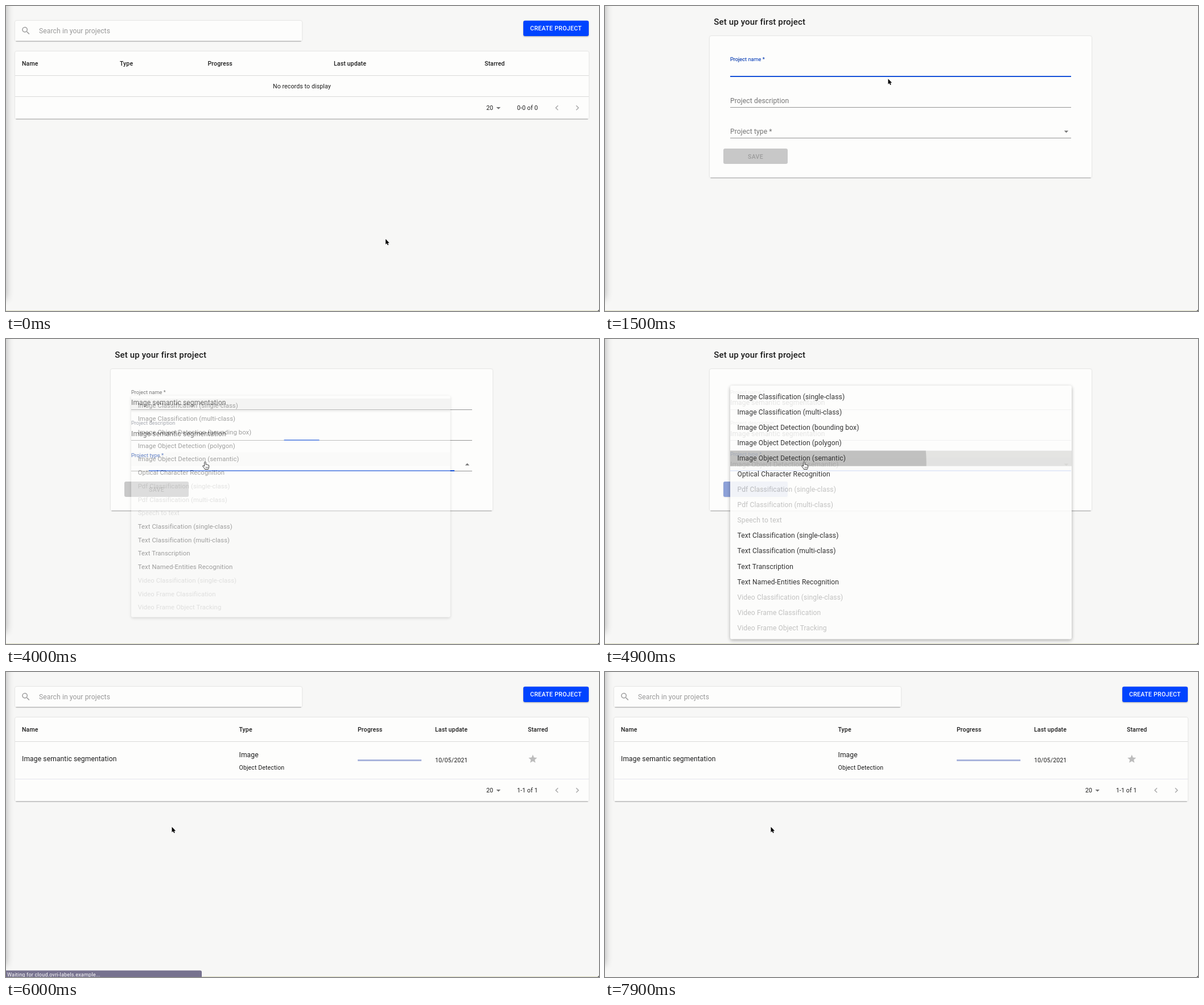
Write an HTML page that moves like this. It is 1042 px wide and 537 px high and loops after 8000 ms.

```html
<!DOCTYPE html>
<html lang="en">
<head>
<meta charset="utf-8">
<title>Project setup</title>
<style>
html, body { margin: 0; width: 100%; height: 100%; overflow: hidden; background: #f7f7f6; }
svg { display: block; width: 1042px; height: 537px; font-family: Roboto, sans-serif; }
text { white-space: pre; }
.card { filter: drop-shadow(0 .5px .8px rgba(0,0,0,.18)); }
.btn { filter: drop-shadow(0 1px 1px rgba(0,0,0,.3)); }
.menu { filter: drop-shadow(0 2px 3px rgba(0,0,0,.34)); }
.edge { filter: blur(7px); }
</style>
</head>
<body>
<svg id="stage" viewBox="0 0 1042 537"></svg>
<script>
const LOOP = 8000, STEP = 100;
const BODY = 12.08, SMALL = 10.57, TINY = 9.06;
const INK = '#1c1c1c', PAPER = '#fdfdfc', BLUE = '#0044ff', FOCUS = '#1450d8', MUTED = '#757575';
const FORM_AT = 1100, DESC_AT = 2700, OPEN_AT = 3882, PRESS_AT = 4717, CLOSE_AT = 4832,
      LEAVE_AT = 5700, DONE_AT = 5900, STATUS_END = 7700;
const VALUE = 'Image semantic segmentation', CHOICE = 'Image Object Detection (semantic)';
// a leading dash marks a disabled item
const ITEMS = ['Image Classification (single-class)', 'Image Classification (multi-class)',
  'Image Object Detection (bounding box)', 'Image Object Detection (polygon)', CHOICE,
  'Optical Character Recognition', '-Pdf Classification (single-class)',
  '-Pdf Classification (multi-class)', '-Speech to text', 'Text Classification (single-class)',
  'Text Classification (multi-class)', 'Text Transcription', 'Text Named-Entities Recognition',
  '-Video Classification (single-class)', '-Video Frame Classification', '-Video Frame Object Tracking'];
const ICON = {
  search: 'M15.5 14h-.79l-.28-.27A6.5 6.5 0 1 0 13.73 14.43l.27.28v.79l5 4.99L20.49 19zM9.5 14a4.5 4.5 0 1 1 0-9 4.5 4.5 0 0 1 0 9z',
  down: 'M7 10l5 5 5-5z',
  up: 'M7 14l5-5 5 5z',
  prev: 'M15.41 7.41L14 6l-6 6 6 6 1.41-1.41L10.83 12z',
  next: 'M10 6L8.59 7.41 13.17 12l-4.58 4.59L10 18l6-6z',
  star: 'M12 17.27L18.18 21l-1.64-7.03L22 9.24l-7.19-.61L12 2 9.19 8.63 2 9.24l5.46 4.73L5.82 21z'
};
const ARROW = 'M0 0V10.6L2.4 8.4L4 12L5.8 11.2L4.2 7.7H7.4Z';
const HAND = 'M-1.3 7.5V.8a1.2 1.2 0 0 1 2.4 0V4.6q1.2-.7 2 .3q1.2-.5 1.8.5q1.6-.4 1.7 1.2V9q0 2-1.2 3.2V13H-.6V12.2L-4.2 7.8q-.5-1.6 1.3-1.3Z';
// time, x, y of the pointer
const PATH = [[0, 667, 412], [300, 667, 412], [800, 950, 42], [1100, 950, 42], [1500, 497.5, 130],
  [3450, 497.5, 130], [3800, 350, 216.5], [4900, 350, 216.5], [5250, 291.5, 274.5], [LOOP, 291.5, 274.5]];

const clamp = v => Math.max(0, Math.min(1, v));
const span = (t, start, len) => clamp((t - start) / len);
const within = (t, a, b) => t >= a && t < b;

// CSS cubic-bezier, solved by bisection
function bezier(x1, y1, x2, y2) {
  const at = (a, b, u) => 3 * (1 - u) ** 2 * u * a + 3 * (1 - u) * u * u * b + u ** 3;
  return x => {
    let lo = 0, hi = 1;
    for (let i = 0; i < 24; i++) {
      const mid = (lo + hi) / 2;
      if (at(x1, x2, mid) < x) lo = mid; else hi = mid;
    }
    return at(y1, y2, lo);
  };
}
const easeOut = bezier(0, 0, .2, 1), easeInOut = bezier(.4, 0, .2, 1);

const rect = (x, y, w, h, fill, more = '') =>
  `<rect x="${x}" y="${y}" width="${w}" height="${h}" fill="${fill}" ${more}/>`;
const card = (x, y, w, h) => rect(x, y, w, h, PAPER, 'rx="3" class="card"')
  + rect(x + 1.5, y + h - .6, w - 3, 1.3, '#b2b2b2');
// y is the middle of the capital letters
const text = (s, x, y, size = BODY, fill = INK, weight = 400, gap = .113) =>
  `<text x="${x}" y="${y + size * .355}" font-size="${size}" fill="${fill}" font-weight="${weight}" letter-spacing="${gap}">${s}</text>`;
const icon = (name, x, y, fill) =>
  `<path d="${ICON[name]}" fill="${fill}" transform="translate(${x} ${y}) scale(.755) translate(-12 -12)"/>`;

function backdrop(t) {
  return rect(0, 0, 1042, 537, '#f7f7f6')
    + rect(-30, -40, 30, 556, '#000', 'opacity=".3" class="edge"')
    + (t < STATUS_END ? rect(0, 536, 1042, 1, '#dedec2') : '')
    + '<path d="M1042 534.5V537H1039.5Z" fill="#555"/>';
}

function list(t) {
  const full = t >= DONE_AT;
  const bottom = full ? 228 : 199, line = full ? 188 : 159, foot = bottom - 19.8;
  const cols = full ? [28, 409.5, 618, 754, 917] : [28, 200, 354.5, 576, 841];
  let s = card(16, 26, 504, 36) + icon('search', 35, 43.5, '#a0a0a0')
    + text('Search in your projects', 58, 43.5, BODY, '#989898')
    + rect(909, 25.7, 115, 27.2, within(t, 700, FORM_AT) ? '#0030b3' : BLUE, 'rx="3" class="btn"')
    + text('CREATE PROJECT', 921, 39.5, SMALL, '#fff', 500, .302)
    + card(16, 80, 1008, bottom - 80)
    + ['Name', 'Type', 'Progress', 'Last update', 'Starred']
      .map((h, i) => text(h, cols[i], 101.2, SMALL, INK, 500)).join('')
    + rect(16, 122, 1008, 1, '#d9d9d9') + rect(16, line, 1008, 1, full ? '#e4e4ec' : '#d9d9d9');
  s += full
    ? text(VALUE, 28, 153) + text('Image', 409.5, 145.5) + text('Object Detection', 409.5, 168.5, SMALL)
      + rect(618, 154, 112, 3, '#a9b4dc') + text('10/05/2021', 754, 155.5, SMALL)
      + icon('star', 925.7, 153, '#bcbcbc')
    : text('No records to display', 469, 141.5, SMALL);
  return s + text('20', 844, foot - .2, SMALL) + icon('down', 865.3, foot + .3, MUTED)
    + text(full ? '1-1 of 1' : '0-0 of 0', 898, foot + .4, SMALL)
    + icon('prev', 968, foot, '#ababab') + icon('next', 1004, foot, '#ababab');
}

function field(label, y, value, focus, raised) {
  const size = BODY - (BODY - TINY) * raised;
  const line = Math.round(y + 11.5);
  const caption = fill => text(label, 220, y - 18.3 * raised, size, fill, 400, size * .0094);
  return caption(MUTED) + `<g opacity="${focus}">${caption(FOCUS)}</g>`
    + text(value, 220, y)
    + rect(220, line, 599, 1, '#949494')
    + (focus > 0 ? rect(519.5 - 299.5 * focus, line - 1, 599 * focus, 2, FOCUS) : '');
}

function form(t) {
  const swap = start => easeOut(span(t, start, 200));
  const typed = start => VALUE.slice(0, Math.round(VALUE.length * span(t, start, 850)));
  const picked = t >= CLOSE_AT;
  const ready = easeInOut(span(t, CLOSE_AT, 250));
  const open = within(t, OPEN_AT, CLOSE_AT);
  return text('Set up your first project', 191.3, 27.3, 15.1, INK, 500)
    + card(184, 53, 671, 249.5)
    + (picked ? rect(220, 209, 599, 23, '#ebebea') : '')
    + field('Project name *', 112.2, typed(1700), 1 - swap(DESC_AT), 1)
    + field('Project description', 166.4, typed(2850), swap(DESC_AT) - swap(OPEN_AT), swap(DESC_AT))
    + field('Project type *', 220.7, picked ? CHOICE : '', swap(OPEN_AT), swap(OPEN_AT))
    + icon(open ? 'up' : 'down', 810.5, 221, MUTED)
    + rect(208, 251, 113, 27, '#c8c8c8', 'rx="3"')
    + text('SAVE', 251, 265, SMALL, '#9c9c9c', 500, .302)
    + `<g opacity="${ready}">`
    + rect(208, 251, 113, 27, t >= 5150 ? '#002fb3' : BLUE, 'rx="3" class="btn"')
    + text('SAVE', 251, 265, SMALL, '#fff', 500, .302) + '</g>';
}

function menu(t) {
  if (!within(t, OPEN_AT, CLOSE_AT + 375)) return '';
  const alpha = easeInOut(span(t, OPEN_AT, 375)) - easeInOut(span(t, CLOSE_AT, 375));
  const grow = easeInOut(span(t, OPEN_AT, 250)) - easeInOut(span(t, CLOSE_AT + 125, 250));
  const k = .75 + .25 * grow;
  // highlight passes from the first item to the hovered one
  const hover = span(t, OPEN_AT + 80, 150);
  const band = (i, a) => rect(220, 88 + i * 27.15, 600, 27.15, '#e2e2e0', `opacity="${a}"`);
  let s = rect(220, 82, 600, 446.5, PAPER, 'rx="3" class="menu"') + band(0, 1 - hover) + band(4, hover);
  if (t >= PRESS_AT) {
    const r = 469 * easeInOut(span(t, PRESS_AT, 550));
    const fade = .18 * (1 - span(t, CLOSE_AT + 50, 500));
    s += '<clipPath id="row"><rect x="220" y="196.6" width="600" height="27.15"/></clipPath>'
      + `<circle cx="351" cy="217" r="${r}" opacity="${fade}" clip-path="url(#row)"/>`;
  }
  ITEMS.forEach((item, i) => {
    const off = item[0] === '-';
    s += text(off ? item.slice(1) : item, 232.5, 101.6 + i * 27.15, BODY, off ? '#bcbcbb' : INK);
  });
  return `<g opacity="${alpha}" transform="translate(220 222) scale(${k} ${k * k}) translate(-220 -222)">${s}</g>`;
}

function status(t) {
  if (!within(t, LEAVE_AT, STATUS_END)) return '';
  return '<path d="M0 525.5H341Q344 525.5 344 528.5V537H0Z" fill="#77728f"/>'
    + text('Waiting for cloud.ovri-labels.example...', 2, 533, TINY, '#fff', 400, .2);
}

function pointer(t) {
  if (within(t, 1700, 3450)) return '';
  const i = PATH.findIndex(p => p[0] > t);
  const [t0, x0, y0] = PATH[i - 1], [t1, x1, y1] = PATH[i];
  const e = easeInOut((t - t0) / (t1 - t0));
  const x = x0 + (x1 - x0) * e, y = y0 + (y1 - y0) * e;
  const hand = within(t, 700, 1200) || within(t, 3700, 5000) || within(t, 5150, LEAVE_AT);
  return hand
    ? `<g transform="translate(${x} ${y})" stroke="#222"><path d="${HAND}" fill="#fff" stroke-width=".9"/>`
      + '<path d="M1.3 8.5V11M3 8.5V11M4.7 8.5V11" stroke-width=".6"/></g>'
    : `<path d="${ARROW}" transform="translate(${x} ${y - 1.7}) scale(.9)" fill="#000" stroke="#fff" stroke-width="1.2" paint-order="stroke"/>`;
}

function page(t) {
  if (t < FORM_AT || t >= DONE_AT) return list(t);
  return t < LEAVE_AT ? form(t) + menu(t) : '';
}

const stage = document.getElementById('stage');
let shown = -1;
function draw(now) {
  const t = Math.floor((now % LOOP) / STEP) * STEP;
  if (t !== shown) {
    shown = t;
    stage.innerHTML = backdrop(t) + page(t) + status(t) + pointer(t);
  }
  requestAnimationFrame(draw);
}
draw(0);
</script>
</body>
</html>
```
